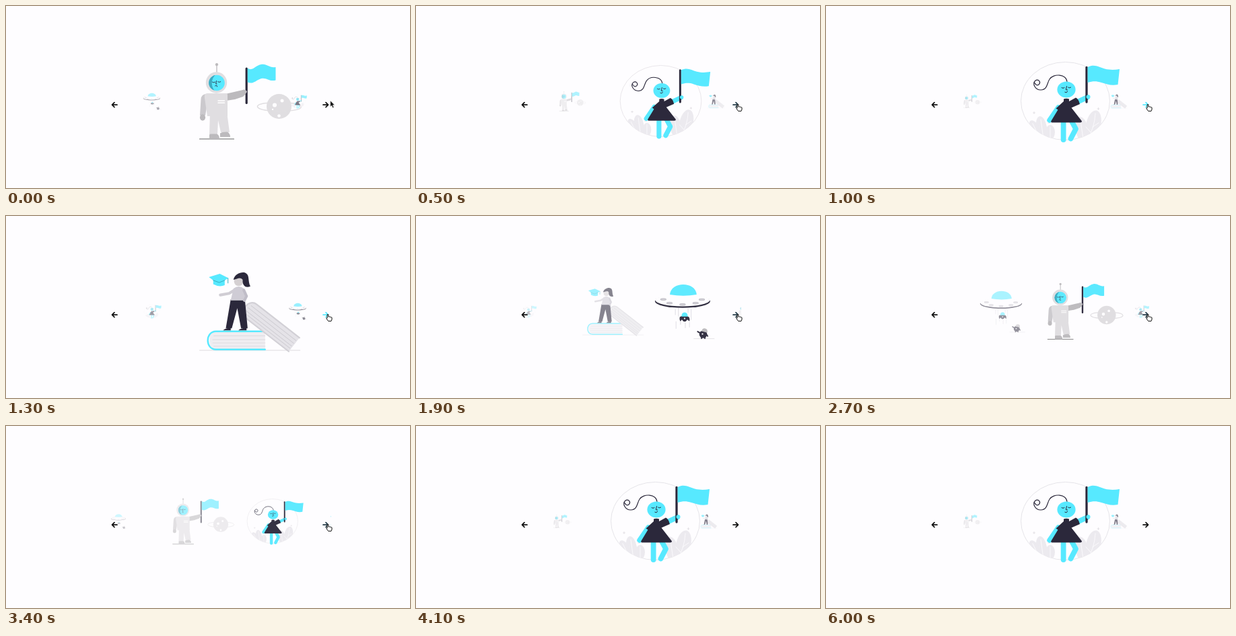
Write an HTML page that moves like this. It is 600x271 px and loops after 6.3 s.

```html
<!DOCTYPE html>
<html lang="en">
<head>
<meta charset="utf-8">
<title>Carousel</title>
<style>
  html, body { margin: 0; width: 100%; height: 100%; overflow: hidden; background: #fefdff; }
  svg { display: block; width: 100%; height: 100%; }
  .c { fill: #57e9ff; }
  .d { fill: #2b283b; }
  .g { fill: #e0dee1; }
  .m { fill: #bcbabd; }
  .w { fill: #fefdff; }
  .ln { fill: none; stroke-linecap: round; stroke-linejoin: round; }
  .ink { stroke: #2b283b; }
  .cy { stroke: #57e9ff; }
  .pale { stroke: #dddbe0; }
</style>
</head>
<body>
<svg viewBox="0 0 600 271">
  <defs>
    <clipPath id="view"><rect x="156" y="0" width="327" height="271"/></clipPath>
    <clipPath id="oval"><ellipse cx="355.5" cy="141.5" rx="66" ry="58"/></clipPath>
    <clipPath id="visor"><circle cx="313" cy="114.5" r="11.8"/></clipPath>
    <g id="window"><ellipse rx="4.4" ry="1.4" fill="#d2d0d6" stroke="#8f8d99" stroke-width=".4"/></g>
  </defs>

  <g clip-path="url(#view)">
    <!-- astronaut -->
    <g class="slide">
      <path class="ln" stroke="#666" stroke-width="1.1" d="M287.5 198H338.5"/>
      <circle class="g" cx="405.5" cy="149.5" r="18.5"/>
      <g class="w">
        <circle cx="399" cy="147.5" r="3.1"/>
        <circle cx="410" cy="141" r="2.5"/>
        <circle cx="405.5" cy="163.5" r="2.3"/>
        <circle cx="396" cy="154" r="1.2"/>
      </g>
      <path class="ln" stroke="#e0dee1" stroke-width="1.5" d="M388 144.5C367 146 369 154 392 156C416 158 440 155 438 150C437 146 430 145 423 144.5"/>
      <path class="ln" stroke="#bcbabd" stroke-width="1.3" d="M313 88V99"/>
      <circle class="m" cx="313" cy="87.2" r="2.1"/>
      <path class="m" d="M326 131L343 127L354 124.5L357 130L352 135L340 139L327 141Z"/>
      <path class="g" d="M303 158H328L332 188H319L315 170L314 191H302Z"/>
      <path class="m" d="M302 198V192Q302 190 305 190.5H313Q317 192 317 198ZM318 195V189.5Q321 187 329 187.5Q333 190 333 195Z"/>
      <path fill="#cbc9cd" d="M298 131Q290 131 289.5 139L288 163H296L299 145Z"/>
      <ellipse class="m" cx="292" cy="166" rx="4.1" ry="4.7"/>
      <path class="g" d="M299 130H327Q329 130 329 133V164H299L295 137Q294 130 299 130Z"/>
      <path class="ln" stroke="#fff" stroke-width="1.5" d="M315 141H324.5M315 144.3H324.5"/>
      <circle class="g" cx="312.5" cy="114" r="15.7"/>
      <circle class="c" cx="313" cy="114.5" r="11.8"/>
      <path clip-path="url(#visor)" fill="#3cabc1" d="M300 101H313C304 107 303 121 312 128H300Z"/>
      <path class="ln ink" stroke-width=".9" d="M306.5 113.3Q308.5 114.7 310.5 113.3M314.7 112.8Q316.7 114.2 318.7 112.8M312.5 111.5L311.7 116H313M310.5 119Q314 117 313.5 120"/>
      <path class="ln ink" stroke-width="3.2" d="M357.2 93.2V144.5"/>
      <path class="m" d="M350 126Q354 123 358 127Q357 132 351 132Z"/>
      <path class="c" d="M358.8 92.5C366 98 371 88 379 87C388 85.5 391 93 400.5 91V110.5C391 113 387 106 379 108C370 111 368 117 358.8 113.5Z"/>
    </g>

    <!-- girl with flag -->
    <g class="slide">
      <ellipse cx="355.5" cy="141.5" rx="66" ry="58" fill="none" stroke="#e3e1e6" stroke-width=".9"/>
      <g clip-path="url(#oval)">
        <g fill="#eceaef">
          <ellipse cx="320" cy="181" rx="8" ry="17" transform="rotate(-9 320 181)"/>
          <ellipse cx="311" cy="184" rx="7" ry="15" transform="rotate(-28 311 184)"/>
          <ellipse cx="333" cy="188" rx="7" ry="11"/>
          <ellipse cx="397" cy="177" rx="11" ry="22" transform="rotate(13 397 177)"/>
          <ellipse cx="380" cy="184" rx="9" ry="19" transform="rotate(-8 380 184)"/>
        </g>
        <path class="ln" stroke="#fefdff" stroke-width=".8" d="M319 169L323 198M307 175L318 198M333 180V198M400 160Q399 180 389 198M378 170L382 198M396 180L405 174M393 188L386 180"/>
      </g>
      <path class="ln pale" stroke-width=".8" d="M307.5 159H310.5M309 157.5V160.5M403 153H406M404.500 151.500V154.500M329.500 174H332.500"/>
      <path class="ln ink" stroke-width="1.2" d="M358 113C357 101 338 100 332 109C328 115 329 125 319 125C311 125 306 116 310.500 111.500C315 108 320 113 316 117C313.500 119 311 117 310 114.500"/>
      <path class="ln cy" stroke-width="7.8" stroke-linecap="butt" d="M352.600 170V199M364 170L371 183L363.500 197.500"/>
      <path class="ln cy" stroke-width="7.500" stroke-linecap="butt" d="M345 151L332 170"/>
      <path class="ln cy" stroke-width="7.500" d="M372 143.500L388 136"/>
      <path class="d" d="M353 138.500Q357 136.800 361 138.500V142L371 136.500Q375 138 377 146L364.500 151.500L380 171.500Q380 173.500 378 173.500H335.500Q333.500 173 334.500 171L344.500 154.500L341.500 152.500L353 142Z"/>
      <ellipse class="c" cx="357" cy="124.500" rx="13.600" ry="12"/>
      <path class="ln ink" stroke-width="1" d="M350 121.700Q352 123.200 354 121.700M359.700 121.200Q361.500 122.700 363.500 121.200M357.500 119.500L356.300 124.800H358.500M354.800 128.200Q358 130 358.500 127"/>
      <path class="ln ink" stroke-width="3.300" d="M387 91.500V143"/>
      <circle class="c" cx="389.500" cy="135.300" r="3"/>
      <path class="c" d="M388.600 91C399 86 405 91 414 93.500C422 95.500 429 95 436 94L433.500 117C424 119 417 116.500 409 114C401 111.500 396 112 388.600 114Z"/>
    </g>

    <!-- student on books -->
    <g class="slide">
      <g transform="translate(362 142) scale(1.623) translate(-295 -142)">
        <path class="ln pale" stroke-width=".7" d="M249 177.800H341"/>
        <path fill="#efedf1" d="M263 161H309V176.500H263Q258 176 258 168.700Q258 161 263 161Z"/>
        <path class="ln" stroke="#d9d7dd" stroke-width=".5" d="M262 164.500H309M261 168H309M261 171H309M262 174H309"/>
        <path class="ln cy" stroke-width="1.500" d="M309 160.300H264C254 160.300 254 177 264 177H309"/>
        <g transform="translate(298 133) rotate(38)">
          <path fill="#e5e3e8" d="M3 0H54V16H3Q-3 14 -3 8Q-3 1 3 0Z"/>
          <path class="ln" stroke="#cfcdd3" stroke-width=".6" d="M1 4H53M0 7.300H53M0 10.500H53M2 13H53"/>
          <path class="ln" stroke="#d2d0d6" stroke-width="1.300" d="M54 0H4C-5 0-5 16 4 16H54"/>
        </g>
        <path class="ln" stroke="#d0cdd4" stroke-width="2.600" d="M281 122.500L276 125.500L268 127"/>
        <path class="d" d="M277.500 131H290.500L293 157.500H287L283.500 139L278.500 157.500H273Z"/>
        <path class="d" d="M270.500 159.500Q273 157 277.500 157.300V159.500ZM284.500 159.500Q287 157 292 157.300V159.500Z"/>
        <path fill="#cfccd5" d="M280 121Q285 117.500 289.500 121L291.500 132H277.500Z"/>
        <path class="ln" stroke="#c0bdc8" stroke-width="2.500" d="M289.500 122.500L292 128L290 132"/>
        <circle fill="#d5d0d2" cx="284.800" cy="114.500" r="4.200"/>
        <path class="d" d="M280 113C281 107 289 105 291.500 107C295 109 293 114 295.500 119C291 121 288 118 288.500 113C286 110 284 112 280 113Z"/>
        <path class="c" d="M257.500 110.500L267.500 107.500L275.500 111.500L272 113.500V118Q267 120 261.500 117V113.500Z"/>
        <path class="ln" stroke="#36aebf" stroke-width=".6" d="M261.500 113.500L267 115.500L272 113.500M275 111.700V116"/>
      </g>
    </g>

    <!-- saucer -->
    <g class="slide">
      <g transform="translate(362 142) scale(1.789) translate(-400.500 -142)">
        <path class="ln" stroke="#c9c7cf" stroke-width=".6" d="M386.500 139V147M391 137V149M394 151V161M405 138V144M409.500 139V154M387.500 157V167M401 159V166M407 158V165"/>
        <ellipse class="d" cx="397" cy="127.300" rx="40.200" ry="9.600"/>
        <ellipse class="w" cx="397" cy="125.700" rx="39.600" ry="8.900"/>
        <path class="c" d="M378.500 117.500C380 98 416 98 417.500 117.500Q398 121 378.500 117.500Z"/>
        <use href="#window" x="369" y="124.500"/>
        <use href="#window" x="378" y="130"/>
        <use href="#window" x="397" y="132"/>
        <use href="#window" x="416" y="130"/>
        <use href="#window" x="425" y="124.800"/>
        <path class="d" d="M393 150Q392 154 394 156.500L396 154Q400 160 404 154L407 156.500Q408 152 406 150Q400 146 393 150Z"/>
        <path class="c" d="M395.500 149.500Q395.500 143.500 400 143.500Q404.500 143.500 404.500 149.500Z"/>
        <circle class="w" cx="400" cy="152.300" r="1.100"/>
        <path class="ln pale" stroke-width=".8" d="M413.500 181.800H443"/>
        <ellipse class="d" cx="427" cy="175.500" rx="5.700" ry="5.500"/>
        <path class="ln ink" stroke-width="1.900" d="M423 174L419 171.500M431 175L433.500 178M425 180L424.500 181.300M429 180L429.500 181.300"/>
        <path class="m" d="M424.500 171Q426 166 430 167Q434 168 433 173Z"/>
        <circle class="w" cx="426" cy="175" r="1.100"/>
      </g>
    </g>
  </g>

  <path class="ln" stroke="#111" stroke-width="1.700" d="M165 147.200H158M161 143.700L157.500 147.200L161 150.700"/>
  <path id="next" class="ln" stroke-width="1.700" d="M471 147.200H478M475 143.700L478.500 147.200L475 150.700"/>
  <path id="pointer" fill="#111" stroke="#fff" stroke-width=".5" d="M0 0V9L2 7.200L3.600 10.700L5.200 10L3.700 6.600H6.400Z"/>
  <path id="hand" fill="#fff" stroke="#111" stroke-width="1" stroke-linejoin="round" d="M-.9 .9Q0-.4 .9 .9V4L2.600 4L4.200 4.500L6 5.200V8L5 10.500H.6L-2 6.800Q-2.300 5-.9 6Z"/>
</svg>
<script>
const LOOP = 6300, GLIDE = 300, LEAVE = 3950;
const clicks = [316, 1016, 1816, 2580, 3316];

// Value by slot: -1 left, 0 centre, 1 right, +-2 out of view
const slotX = [[-2, 114], [-1, 217.5], [0, 362], [1, 434], [2, 543]];
const slotScale = [[-2, .13], [-1, .175], [0, 1], [1, .175], [2, .13]];
const slotAlpha = [[-2, .1], [-1, .45], [-.67, .5], [-.47, .57], [0, 1], [.53, .95], [1, .6], [2, .1]];

const slides = [...document.querySelectorAll('.slide')];
const [next, pointer, hand] = ['next', 'pointer', 'hand'].map(id => document.getElementById(id));
const clamp = v => Math.min(1, Math.max(0, v));

function along(points, v) {
  let i = 1;
  while (i < points.length - 1 && v > points[i][0]) i++;
  const [a, b] = [points[i - 1], points[i]];
  return a[1] + (b[1] - a[1]) * (v - a[0]) / (b[0] - a[0]);
}

// cubic-bezier(.25, .1, .25, 1)
function ease(x) {
  if (x <= 0 || x >= 1) return clamp(x);
  const bez = (a, b, u) => 3 * a * u * (1 - u) ** 2 + 3 * b * u * u * (1 - u) + u ** 3;
  let lo = 0, hi = 1;
  for (let i = 0; i < 20; i++) {
    const mid = (lo + hi) / 2;
    if (bez(.25, .25, mid) < x) lo = mid; else hi = mid;
  }
  return bez(.1, 1, lo);
}

function draw(t) {
  const turn = clicks.reduce((sum, c) => sum + ease((t - c) / GLIDE), 0);
  slides.forEach((el, i) => {
    const slot = ((i - turn + 2) % 4 + 8) % 4 - 2;
    const s = along(slotScale, slot);
    el.setAttribute('transform', `translate(${along(slotX, slot)} 142) scale(${s}) translate(-362 -142)`);
    el.setAttribute('opacity', along(slotAlpha, slot));
  });

  const move = clamp((t - 100) / 150);
  const at = `translate(${481.7 - 3.7 * move} ${141 + 5 * move})`;
  const over = t >= 200 && t < LEAVE;
  const pressed = clicks.some(c => t >= c && t < c + 200);
  pointer.setAttribute('transform', at);
  hand.setAttribute('transform', at);
  pointer.style.display = t < 200 ? '' : 'none';
  hand.style.display = over ? '' : 'none';
  next.style.stroke = !over ? '#111' : pressed ? '#233b48' : '#57e9ff';
}

const start = performance.now();
function tick() {
  draw((performance.now() - start) % LOOP);
  requestAnimationFrame(tick);
}
tick();
</script>
</body>
</html>
```
